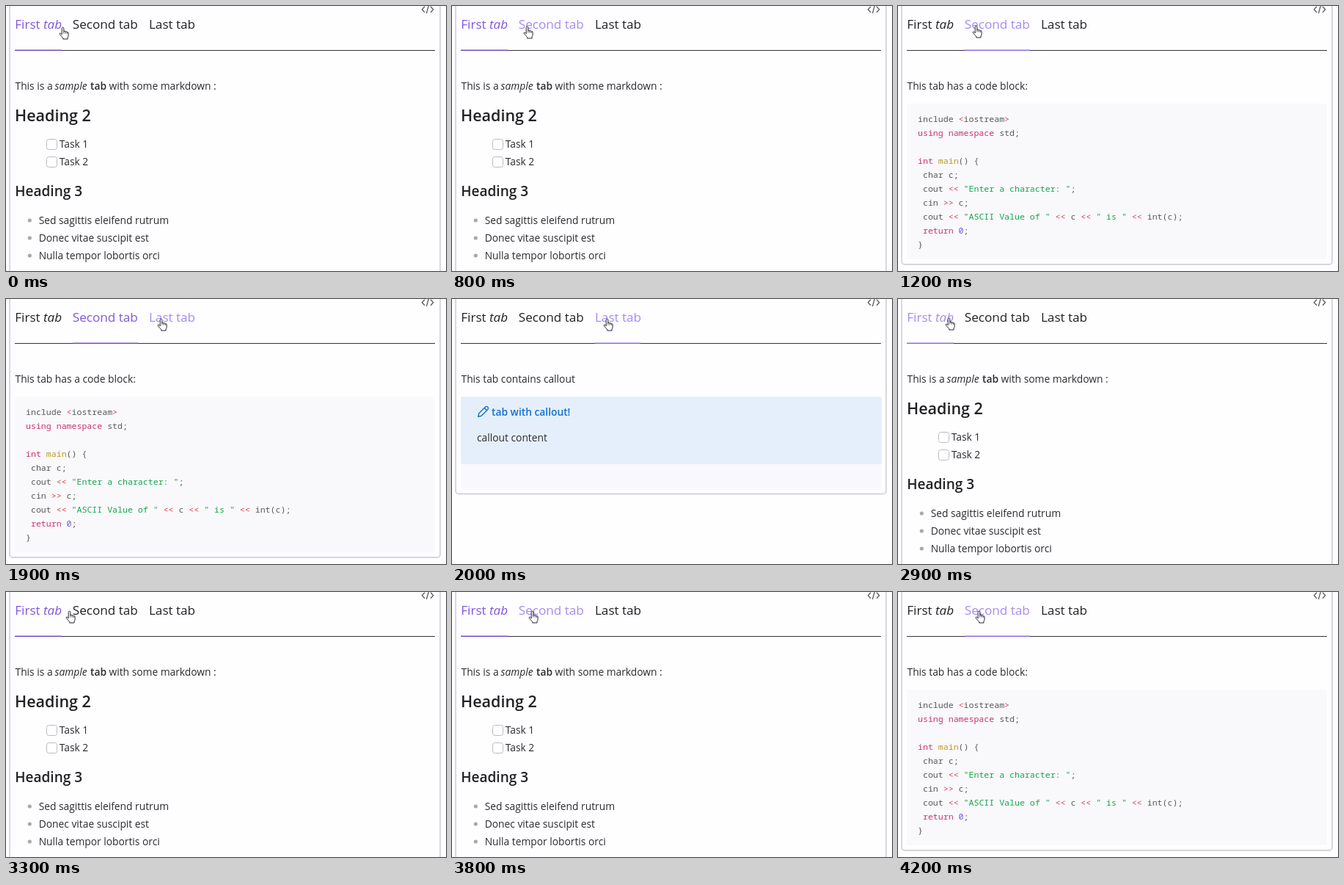
Recreate the animation shown at these times as an HTML page. Size 600 by 361 pixels, loop 4300 ms.

```html
<!DOCTYPE html>
<html lang="en">
<head>
<meta charset="utf-8">
<title>Tabs</title>
<style>
  html, body { margin: 0; width: 100%; height: 100%; overflow: hidden; background: #fefdff; }
  svg { display: block; width: 600px; height: 361px; }
  text { font: 13.8px "Open Sans", "Noto Sans", sans-serif; fill: #2b2b2b; white-space: pre; }
  .tab text { font-size: 17.1px; }
  .i { font-style: italic; }
  .b { font-weight: 600; }
  text.h2 { font-size: 21.5px; font-weight: 600; fill: #222; }
  text.h3 { font-size: 19px; font-weight: 600; fill: #222; }
  #code text { font: 11.58px "Noto Sans Mono", "DejaVu Sans Mono", monospace; fill: #5a5a5c; }
  #code .k { fill: #c63673; }
  #code .o { fill: #d93a48; }
  #code .s { fill: #14a74c; }
  #code .f { fill: #bd9a1c; }
  #code .n { fill: #7852ee; }
</style>
</head>
<body>
<svg viewBox="0 0 600 361">
  <rect width="600" height="361" fill="#fefdff"/>
  <rect id="card" x="5" y="-10" width="587" height="390" rx="4" fill="none" stroke="#d6d4dc" stroke-width="1.8"/>
  <path d="M571 .8L567.3 4.8L571 8.8M576.4 -.6L573.4 10M579 .8L582.7 4.8L579 8.8" fill="none" stroke="#5c5c60" stroke-width="1.3"/>
  <g class="tab"><text x="12.3" y="31">First <tspan class="i">tab</tspan></text></g>
  <g class="tab"><text x="90.8" y="31">Second tab</text></g>
  <g class="tab"><text x="195" y="31">Last tab</text></g>
  <rect x="12" y="60" width="573" height="1" fill="#343238"/>
  <rect id="mark" y="59.6" height="1.4"/>

  <g class="panel">
    <text x="12.5" y="114">This is a <tspan class="i" x="66.5">sample</tspan> <tspan class="b" x="115">tab</tspan><tspan x="140.5">with some markdown :</tspan></text>
    <text class="h2" x="12" y="157">Heading 2</text>
    <g fill="#fff" stroke="#bdbac3">
      <rect x="55.5" y="181.5" width="14" height="14" rx="3"/>
      <rect x="55.5" y="205.5" width="14" height="14" rx="3"/>
    </g>
    <text x="72.7" y="193">Task 1</text>
    <text x="72.7" y="217">Task 2</text>
    <text class="h3" x="12.3" y="259">Heading 3</text>
    <g fill="#a9a8ad">
      <circle cx="32.3" cy="292" r="2.6"/>
      <circle cx="32.3" cy="316" r="2.6"/>
      <circle cx="32.3" cy="340" r="2.6"/>
    </g>
    <text x="44.7" y="297">Sed sagittis eleifend rutrum</text>
    <text x="44.7" y="321">Donec vitae suscipit est</text>
    <text x="44.7" y="345">Nulla tempor lobortis orci</text>
  </g>

  <g class="panel">
    <text x="12.5" y="114">This tab has a code block:</text>
    <rect x="12" y="133" width="573" height="212" rx="3" fill="#f9f8fb"/>
    <g id="code"></g>
  </g>

  <g class="panel">
    <text x="12.5" y="114">This tab contains callout</text>
    <rect x="12" y="133" width="573" height="126" rx="3" fill="#f9f8fa"/>
    <rect x="12" y="133" width="574" height="92" rx="3" fill="#e5effc"/>
    <path d="M35.6 160.4L36.8 155.8L45.8 146.8Q47.4 145.8 48.8 147.2Q50 148.6 49 150.2L40 159.2ZM44.2 148.6L47.4 151.8" fill="none" stroke="#146fd2" stroke-width="1.4" stroke-linejoin="round"/>
    <text class="b" x="54" y="159" style="fill:#146fd2">tab with callout!</text>
    <text x="34" y="194">callout content</text>
  </g>

  <g id="hand" stroke="#26242a" stroke-width="1" stroke-linejoin="round">
    <path fill="#fff" d="M4 10.3V1.9A1.3 1.3 0 0 1 6.6 1.9V6.4Q6.8 5.5 7.8 5.6Q9 5.7 9 6.9Q9.2 6.1 10.2 6.3Q11.2 6.5 11.2 7.6Q11.5 7 12.2 7.2Q12.9 7.4 12.9 8.6V11.5Q12.9 13 11.8 14.5V16.5H5.5V15Q4 13.5 1.2 10.2Q.5 9 1.5 8.5Q2.5 8.1 4 10.3Z"/>
    <path fill="none" stroke-width=".8" d="M6.6 6.4V9M9 6.9V9.2M11.2 7.6V9.4"/>
  </g>
</svg>
<script>
const LOOP = 4300, STEP = 100;
const ACTIVE = '#7f57da', HOVER = '#a68bef', IDLE = '#222';
const $ = id => document.getElementById(id);
const all = sel => [...document.querySelectorAll(sel)];

// Token marks: {class text}
const lines = [
  'include {o <}iostream{o >}',
  '{k using} {k namespace} std;',
  '',
  '{k int} {f main}() \\{',
  ' char c;',
  ' cout {o <<} {s "Enter a character: "};',
  ' cin {o >>} c;',
  ' cout {o <<} {s "ASCII Value of "} {o <<} c {o <<} {s " is "} {o <<} int(c);',
  ' {k return} {n 0};',
  '\\}'
];
const escape = s => s.replace(/&/g, '&amp;').replace(/</g, '&lt;').replace(/>/g, '&gt;');
$('code').innerHTML = lines.map((line, i) => {
  const body = escape(line)
    .replace(/\{([a-z]) ([^}]*)\}/g, '<tspan class="$1">$2</tspan>')
    .replace(/\\/g, '');
  return `<text x="27" y="${158 + i * 19}">${body}</text>`;
}).join('');

const tabs = [[12, 76], [91, 180], [195, 257]];
const bottoms = [380, 352, 265.5];
const switches = [[0, 0], [1000, 1], [2000, 2], [2900, 0], [4000, 1]];

// Pointer centre: time, x, y
const path = [
  [0, 79, 37], [300, 80, 37], [800, 104, 36], [1200, 108, 35], [1600, 118, 35],
  [1800, 160, 35], [1900, 213, 35], [2400, 213, 35], [2800, 71, 34],
  [3000, 71, 34], [3300, 88, 34], [3800, 111, 34], [4300, 112, 34]
];

function pointer(t) {
  const k = path.findIndex((p, i) => i && t < p[0]);
  const [t0, x0, y0] = path[k - 1], [t1, x1, y1] = path[k];
  const u = (t - t0) / (t1 - t0), e = u * u * (3 - 2 * u);
  return [x0 + (x1 - x0) * e, y0 + (y1 - y0) * e];
}

const labels = all('.tab text'), panels = all('.panel');

function draw(time) {
  const t = Math.floor((time % LOOP) / STEP) * STEP;
  const [x, y] = pointer(t);
  const tip = x - 1.8;
  const active = switches.filter(s => s[0] <= t).pop()[1];
  tabs.forEach(([a, b], i) => {
    const over = tip >= a && tip <= b;
    const color = over ? HOVER : i === active ? ACTIVE : IDLE;
    labels[i].style.fill = color;
    panels[i].style.display = i === active ? '' : 'none';
    if (i === active) {
      $('mark').setAttribute('x', a);
      $('mark').setAttribute('width', b - a);
      $('mark').setAttribute('fill', over ? '#8463dc' : '#6544bd');
    }
  });
  $('card').setAttribute('height', bottoms[active] + 10);
  $('hand').setAttribute('transform', `translate(${x - 6.8} ${y - 8.5})`);
}

const start = performance.now();
function tick() {
  draw(performance.now() - start);
  requestAnimationFrame(tick);
}
tick();
</script>
</body>
</html>
```
